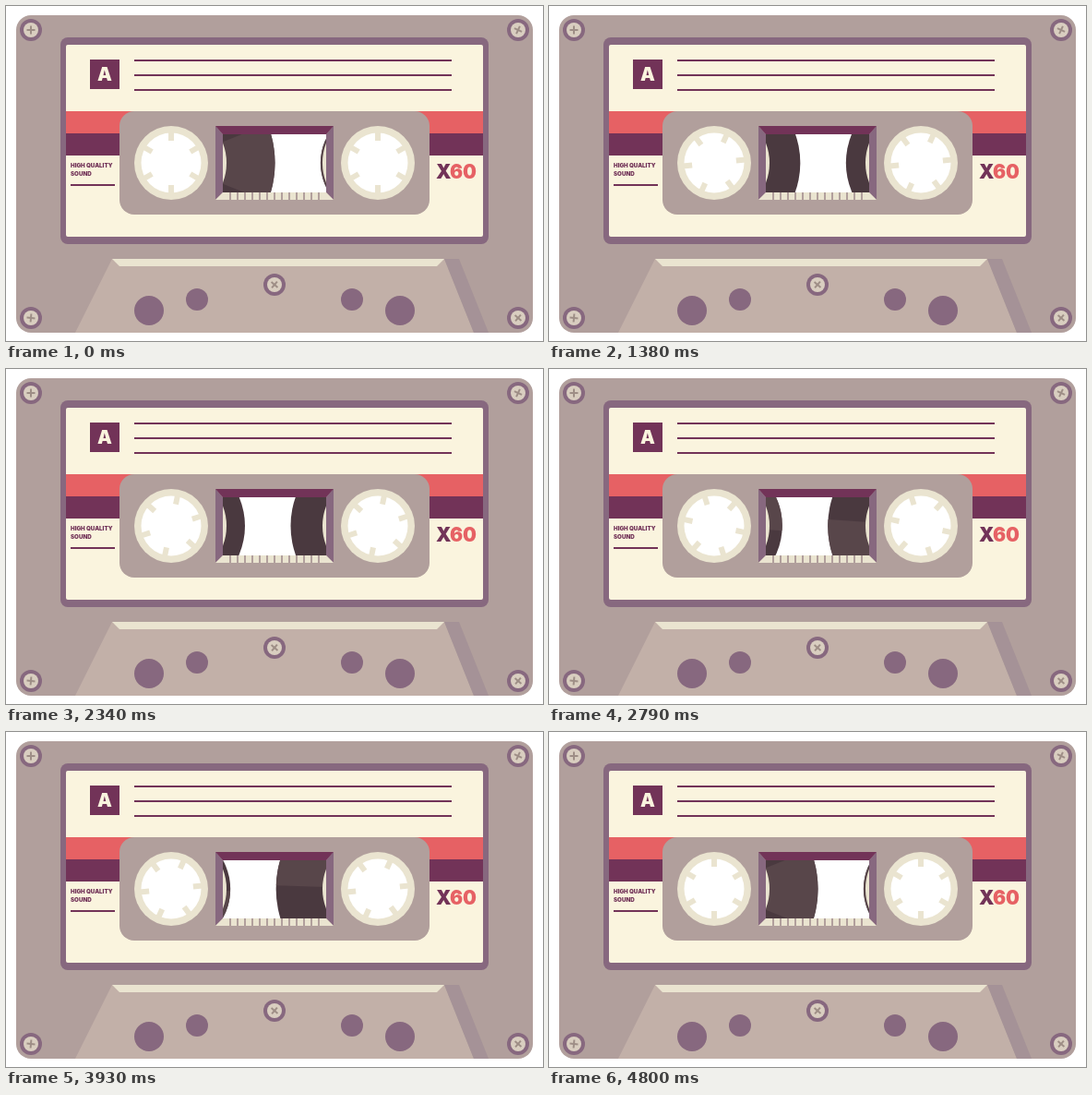
Write an HTML page with a canvas that moves like this. It is 582 px wide and 363 px high and loops after 5.1 s.

```html
<!DOCTYPE html>
<html lang="en">
<head>
<meta charset="utf-8">
<title>Cassette</title>
<style>
  html, body { margin: 0; width: 100%; height: 100%; overflow: hidden; background: #fff; }
  canvas { display: block; width: 582px; height: 363px; }
</style>
</head>
<body>
<canvas id="stage" width="582" height="363"></canvas>
<script>
const ctx = document.getElementById('stage').getContext('2d');
const TAU = Math.PI * 2;
const STEP = 30, LOOP = 5100;
const PLAY_STEPS = 120, REWIND_START = 130, REWIND_STEPS = 30;
const LEFT_X = 179, RIGHT_X = 403, REEL_Y = 170;
const C = {
  body: '#b19f9c', mauve: '#87687f', plum: '#723358', red: '#e66164',
  paper: '#faf4de', cream: '#eae4d0', face: '#c2b0a8', shade: '#a59297',
  tape: '#4a393f', sheen: '#58464a', screw: '#d9cec0', slot: '#9e8e86', white: '#fff'
};

function rect(x, y, w, h, color) {
  ctx.fillStyle = color;
  ctx.fillRect(x, y, w, h);
}

function roundRect(x, y, w, h, r, color) {
  ctx.fillStyle = color;
  ctx.beginPath();
  ctx.roundRect(x, y, w, h, r);
  ctx.fill();
}

function disc(x, y, r, color) {
  ctx.fillStyle = color;
  ctx.beginPath();
  ctx.arc(x, y, r, 0, TAU);
  ctx.fill();
}

function poly(color, ...points) {
  ctx.fillStyle = color;
  ctx.beginPath();
  points.forEach(([x, y]) => ctx.lineTo(x, y));
  ctx.closePath();
  ctx.fill();
}

function text(value, x, y, size, color, align = 'left') {
  ctx.font = `900 ${size}px Inter, sans-serif`;
  ctx.textAlign = align;
  ctx.fillStyle = color;
  ctx.fillText(value, x, y);
}

function turned(x, y, angle, draw) {
  ctx.save();
  ctx.translate(x, y);
  ctx.rotate(angle);
  draw();
  ctx.restore();
}

function screw(x, y, degrees) {
  disc(x, y, 12, C.mauve);
  disc(x, y, 8, C.screw);
  turned(x, y, degrees * TAU / 360, () => {
    rect(-4.5, -1, 9, 2, C.slot);
    rect(-1, -4.5, 2, 9, C.slot);
  });
}

function label() {
  roundRect(59, 34, 464, 224, 8, C.mauve);
  roundRect(65, 42, 452, 208, 2, C.paper);
  rect(91, 58, 32, 32, C.plum);
  text('A', 107, 81, 20, C.paper, 'center');
  for (const y of [58, 74, 90]) rect(139, y, 344, 2, C.plum);
  rect(65, 114, 452, 24, C.red);
  rect(65, 138, 452, 24, C.plum);
  text('HIGH QUALITY', 70, 175, 6.2, C.plum);
  text('SOUND', 70, 184, 6.2, C.plum);
  rect(70, 193, 48, 2, C.plum);
  text('X', 466, 187, 21, C.plum);
  text('60', 510, 187, 21, C.red, 'right');
  roundRect(123, 114, 336, 112, 16, C.body);
}

function tapeRoll(x, radius, angle) {
  disc(x, REEL_Y, radius, C.tape);
  turned(x, REEL_Y, angle, () => {
    const half = 22 * TAU / 360;
    ctx.fillStyle = C.sheen;
    for (const mid of [0, Math.PI]) {
      ctx.beginPath();
      ctx.moveTo(0, 0);
      ctx.arc(0, 0, radius, mid - half, mid + half);
      ctx.fill();
    }
  });
  disc(x, REEL_Y, 60, C.cream);
}

function tapeWindow(played, angle) {
  ctx.save();
  ctx.beginPath();
  ctx.rect(235, 139, 112, 63);
  ctx.clip();
  rect(235, 139, 112, 63, C.white);
  tapeRoll(LEFT_X, 112.5 - 50 * played, angle);
  tapeRoll(RIGHT_X, 62 + 50 * played, angle);
  ctx.restore();

  poly(C.mauve, [227, 130], [235, 139], [235, 202], [227, 210]);
  poly(C.mauve, [355, 130], [347, 139], [347, 202], [355, 210]);
  poly(C.plum, [227, 130], [355, 130], [347, 139], [235, 139]);
  poly(C.cream, [227, 210], [355, 210], [347, 202], [235, 202]);
  for (let x = 242; x < 340; x += 8) rect(x, 202, 2, 8, C.body);
}

function hub(x, angle) {
  disc(x, REEL_Y, 40, C.cream);
  disc(x, REEL_Y, 32.5, C.white);
  for (let i = 0; i < 6; i++) {
    turned(x, REEL_Y, angle + i * TAU / 6, () => rect(-3, -34, 6, 10, C.cream));
  }
}

function base() {
  poly(C.face, [115, 274], [475, 274], [507, 354], [75, 354]);
  poly(C.shade, [475, 274], [491, 274], [523, 354], [507, 354]);
  poly(C.cream, [115, 274], [475, 274], [467, 282], [123, 282]);
  disc(155, 330, 16, C.mauve);
  disc(207, 318, 12, C.mauve);
  disc(375, 318, 12, C.mauve);
  disc(427, 330, 16, C.mauve);
}

// Share of the tape on the right reel: plays, rests, rewinds, rests.
function playedAt(time) {
  const step = Math.floor((time % LOOP) / STEP);
  if (step <= REWIND_START) return Math.min(step / PLAY_STEPS, 1);
  return Math.max(1 - (step - REWIND_START) / REWIND_STEPS, 0);
}

function draw(time) {
  const played = playedAt(time);
  const angle = -2 * TAU * played;
  rect(0, 0, 582, 363, C.white);
  roundRect(11, 10, 560, 344, 16, C.body);
  label();
  tapeWindow(played, angle);
  hub(LEFT_X, angle);
  hub(RIGHT_X, angle);
  base();
  screw(27, 26, 0);
  screw(555, 26, 25);
  screw(27, 338, 5);
  screw(555, 338, 40);
  screw(291, 302, 40);
}

const start = performance.now();
function tick() {
  draw(performance.now() - start);
  requestAnimationFrame(tick);
}
tick();
</script>
</body>
</html>
```
